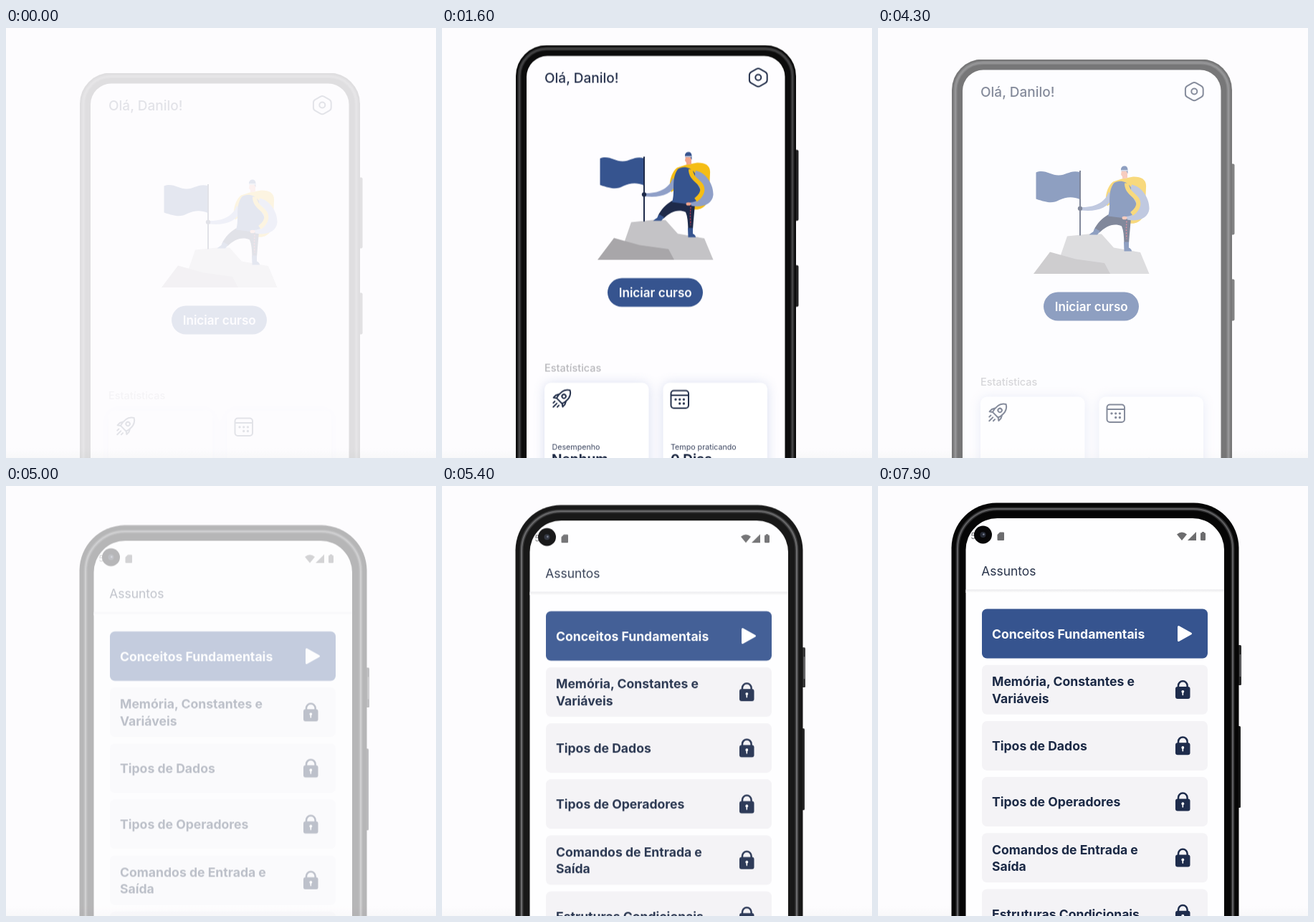
These frames come from a looping animation (600x600 px, 8000 ms). An HTML page:

```html
<!DOCTYPE html>
<html lang="pt-BR">
<head>
<meta charset="utf-8">
<title>App de curso</title>
<style>
  html, body { margin: 0; height: 100%; overflow: hidden; background: #fdfcfe; }
  svg { display: block; width: 100vw; height: 100vh; font-family: Inter, "Open Sans", sans-serif; }

  .phone { animation: 8s infinite; }
  #home { animation-name: home; }
  #topics { animation-name: topics; }

  @keyframes home {
    0% { opacity: .12; transform: translateY(38.7px); animation-timing-function: cubic-bezier(.333, 1, .667, 1); }
    10.06%, 45.75% { opacity: 1; transform: none; animation-timing-function: cubic-bezier(.333, 0, .667, 0); }
    56.25%, 100% { opacity: 0; transform: translateY(44px); }
  }
  @keyframes topics {
    0%, 61.4% { opacity: 0; transform: translateY(44px); animation-timing-function: cubic-bezier(.333, 1, .667, 1); }
    71.9%, 100% { opacity: 1; transform: none; }
  }

  .blue { fill: #36548f; }
  .navy { fill: #1e2a4a; }
  .sky { fill: #8f9fc8; }
  .gold { fill: #f5bd14; }
  .skin { fill: #f2a58c; }
  .icon { fill: none; stroke: #26324d; stroke-width: 2; stroke-linecap: round; stroke-linejoin: round; }
  .rim { fill: none; stroke: #2c2c2d; stroke-width: 5; }
  .shine { fill: none; stroke: #606062; stroke-width: 2; }
  .status { fill: #6c6c6e; }
  .item { fill: #f4f3f6; }
  .hello { font-size: 19px; font-weight: 500; fill: #25304b; }
  .button { font-size: 17.1px; font-weight: 600; fill: #fff; }
  .section { font-size: 14.5px; font-weight: 500; fill: #b7b7bb; }
  .label { font-size: 10.7px; fill: #3c4660; }
  .value { font-size: 19px; font-weight: 700; fill: #1e2a44; }
  .title { font-size: 17.4px; fill: #2a354c; }
  .topic { font-size: 17.6px; font-weight: 700; fill: #1b2945; }
</style>
</head>
<body>
<svg viewBox="0 0 600 600">
  <defs>
    <linearGradient id="floor" x2="0" y2="1">
      <stop offset="0" stop-color="#f8f8f9" stop-opacity="0"/>
      <stop offset="1" stop-color="#f8f8f9"/>
    </linearGradient>
    <linearGradient id="shade" x2="0" y2="1">
      <stop offset="0" stop-color="#e9e9ec"/>
      <stop offset="1" stop-color="#fff"/>
    </linearGradient>
    <filter id="glow" x="-20%" y="-20%" width="140%" height="140%" color-interpolation-filters="sRGB">
      <feDropShadow dx="0" dy="1" stdDeviation="8" flood-color="#a9b9dc" flood-opacity=".45"/>
    </filter>
    <g id="lock">
      <path d="M419 282v-3.500a6.300 6.300 0 0 1 12.600 0v3.500" fill="none" stroke="#1e2c4c" stroke-width="2.500"/>
      <rect x="415" y="280" width="20.500" height="17" rx="3" fill="#1e2c4c"/>
      <path d="M425.300 287.500v4" stroke="#fff" stroke-width="1.600" stroke-linecap="round"/>
      <circle cx="425.300" cy="286.800" r="1.900" fill="#fff"/>
    </g>
    <rect id="card" x="145" width="315" height="69" rx="7"/>
  </defs>
  <rect y="586" width="600" height="14" fill="url(#floor)"/>

  <g id="home" class="phone">
    <rect x="490" y="170" width="7.500" height="99" rx="2" fill="#222"/>
    <rect x="490" y="331" width="7.500" height="58" rx="2" fill="#222"/>
    <rect x="103" y="24" width="391" height="700" rx="43" fill="#0c0c0c"/>
    <rect class="rim" x="108" y="29" width="381" height="700" rx="38"/>
    <rect x="108" y="29" width="381" height="700" rx="38" fill="none" stroke="#444445" stroke-width="2"/>
    <rect x="118" y="39" width="360.500" height="700" rx="29" fill="#fefdff"/>

    <text class="hello" x="143" y="76.300">Olá, Danilo!</text>
    <g class="icon">
      <path d="M438.500 57.300q2.800-1.500 5.600 0l7 4q2.600 1.500 2.600 4.500v6.600q0 3-2.600 4.500l-7 4q-2.800 1.500-5.600 0l-7-4q-2.600-1.500-2.600-4.500v-6.600q0-3 2.600-4.500z"/>
      <circle cx="441.300" cy="69" r="4"/>
    </g>

    <!-- mountain -->
    <path d="M254 300L264 271 298 267.500 312 268 329 287 366 293.500 378.500 323.500H300Z" fill="#c4c3c6"/>
    <path d="M217 323.500L240 293 276 303 316 308.500 324 323.500Z" fill="#a8a6a9"/>

    <!-- flag -->
    <path class="blue" d="M220.500 182C232 177 241 186 252 186S268 178.500 281.500 181.500V219.500C272 215 262 216 253 220.500S238 225 220.500 219Z"/>
    <path d="M282 179.500V270" stroke="#1e2a4a" stroke-width="2"/>

    <!-- climber -->
    <path class="gold" d="M328 195C319 202 315 220 320 229L340 215 350 253C366 255 374 244 373 226L374 203C375 192 368 188 356 188L340 191Z"/>
    <path class="navy" d="M321 241L353 246C352 258 351 268 350 281H343.500C343 272 343 264 340 257C329 252 318 257 309 266L301 263C306 252 313 246 321 241Z"/>
    <path d="M347 250Q346 262 347 275" fill="none" stroke="#c33a55" stroke-width="1.500" stroke-dasharray="2 2"/>
    <path class="blue" d="M303 260L310 264 306 269H294.500Q298 266 300 265ZM343 279H350L350 287Q354 289 354 292H343.500Z"/>
    <path class="sky" d="M322 209C318 222 305 231 284 230.500V235C306 237 321 232 327 217Z"/>
    <path class="blue" d="M329 197C336 192 346 194 351 200C362 216 366 231 360 239L353 247 321 243C326 228 319 211 329 197Z"/>
    <path class="sky" d="M354 199C369 202 379 219 378.500 233C377 246 364 251 348 248L346 243.500C356 243 364 237 362 230C359 220 350 211 354 199Z"/>
    <path d="M347 197C347 214 366 214 363 228Q361 235 354 240" fill="none" stroke="#f5bd14" stroke-width="6"/>
    <ellipse class="skin" cx="344" cy="245.500" rx="3.500" ry="2.300"/>
    <circle class="navy" cx="282" cy="232.300" r="3.200"/>
    <path class="skin" d="M340 179H348V190L341 191V188L339 185Z"/>
    <path class="blue" d="M339 180V177Q340 173 344 173T348.500 178V184L346.500 180Z"/>
    <path d="M339 179.300H348.500" stroke="#dce3f2" stroke-width="1.300"/>

    <rect class="blue" x="231" y="349" width="133" height="40" rx="20"/>
    <text class="button" x="297.700" y="375" text-anchor="middle">Iniciar curso</text>

    <text class="section" x="143" y="479.300">Estatísticas</text>
    <g fill="#fff" filter="url(#glow)">
      <rect x="143" y="495" width="145.500" height="150" rx="9"/>
      <rect x="308.500" y="495" width="145.500" height="150" rx="9"/>
    </g>
    <g class="icon">
      <path transform="translate(168 516) rotate(45)" d="M0-15C7-11 8-3 5.500 6H-5.500C-8-3-7-11 0-15ZM-6.500-1L-9 4V8.500L-5.500 6M6.500-1L9 4V8.500L5.500 6M0 11V18M-4 11V14M4 11V14M2.700-3a2.700 2.700 0 1 1-5.400 0a2.700 2.700 0 1 1 5.400 0"/>
      <rect x="319.500" y="506" width="24.500" height="24.500" rx="4"/>
      <path d="M320 512.500H344"/>
      <path stroke-width="3.400" d="M326 518.300h.01M331.700 518.300h.01M337.400 518.300h.01M331.700 524h.01M337.400 524h.01"/>
    </g>
    <text class="label" x="153.500" y="588.500">Desempenho</text>
    <text class="label" x="319" y="588.500">Tempo praticando</text>
    <text class="value" x="153" y="608.500">Nenhum</text>
    <text class="value" x="319" y="608.500">0 Dias</text>
  </g>

  <g id="topics" class="phone">
    <rect x="499" y="222" width="8" height="56" rx="1.500" fill="#2a2a2b"/>
    <path d="M505.500 235V266" stroke="#77777a" stroke-width="1.500"/>
    <rect x="499" y="335" width="7" height="114" rx="1.500" fill="#1c1c1d"/>
    <rect x="102.500" y="23.500" width="401" height="700" rx="63" fill="#060606"/>
    <rect class="rim" x="111" y="32" width="384" height="700" rx="55"/>
    <rect class="shine" x="111" y="32" width="384" height="700" rx="55"/>
    <rect x="122.500" y="45" width="360.500" height="700" rx="44" fill="#fefeff"/>

    <text class="status" x="129.500" y="74.300" font-size="11.500">5</text>
    <circle cx="146.500" cy="68" r="12.500" fill="#070708"/>
    <circle cx="146.500" cy="68" r="4" fill="#252a35"/>
    <circle cx="147.300" cy="67.500" r="1.300" fill="#7a8294"/>
    <g class="status">
      <path d="M170 64.500H175Q176 64.500 176 65.500V75Q176 76 175 76H167.500Q166.500 76 166.500 75V68Z"/>
      <path d="M417 67.500Q424 61.500 431 67.500L424 76Z"/>
      <path d="M444 64V76H432Z"/>
      <path d="M450 66.500Q450 65.300 451.200 65.300H452V64H455V65.300H455.800Q457 65.300 457 66.500V74.800Q457 76 455.800 76H451.200Q450 76 450 74.800Z"/>
    </g>
    <text class="title" x="144.300" y="125.200">Assuntos</text>
    <rect x="122.500" y="144.500" width="360.500" height="4.500" fill="url(#shade)"/>

    <use class="blue" href="#card" y="171.500"/>
    <path d="M419.500 196.500L436.500 206 419.500 215.500Z" fill="#fff" stroke="#fff" stroke-width="3" stroke-linejoin="round"/>
    <g class="item">
      <use href="#card" y="249.700"/>
      <use href="#card" y="327.900"/>
      <use href="#card" y="406.100"/>
      <use href="#card" y="484.300"/>
      <use href="#card" y="562.500"/>
    </g>
    <use href="#lock"/>
    <use href="#lock" y="78.200"/>
    <use href="#lock" y="156.400"/>
    <use href="#lock" y="234.600"/>
    <use href="#lock" y="312.800"/>
    <g class="topic">
      <text x="159" y="212.500" fill="#fff">Conceitos Fundamentais</text>
      <text x="159" y="279.200">Memória, Constantes e</text>
      <text x="159" y="302.500">Variáveis</text>
      <text x="159" y="369">Tipos de Dados</text>
      <text x="159" y="447.300">Tipos de Operadores</text>
      <text x="159" y="513.700">Comandos de Entrada e</text>
      <text x="159" y="537">Saída</text>
      <text x="159" y="603.800">Estruturas Condicionais</text>
    </g>
  </g>
</svg>
</body>
</html>
```
